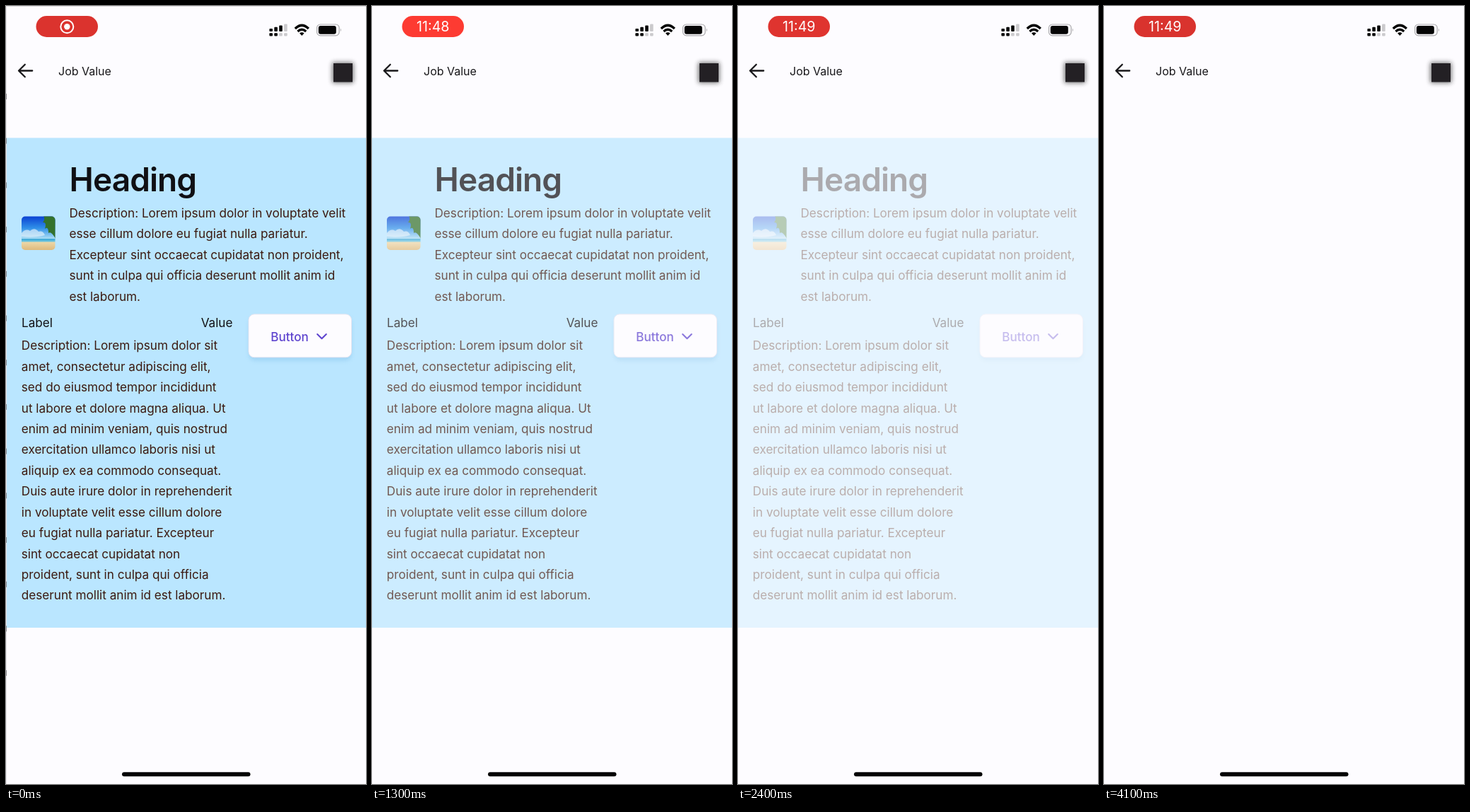
Recreate the animation shown at these times as an HTML page. Size 509 by 1100 pixels, loop 4.2 s.

```html
<!DOCTYPE html>
<html lang="en">
<head>
<meta charset="utf-8">
<title>Fading card</title>
<style>
  html, body { margin: 0; width: 100%; height: 100%; overflow: hidden; background: #fdfcff; }
  svg { display: block; width: 509px; height: 1100px; font-family: Inter, "Noto Sans", sans-serif; }
  .body { font-size: 17.15px; fill: #3b1a10; }
  .label { font-size: 17.15px; fill: #131316; }
  .line { fill: none; stroke-linecap: round; stroke-linejoin: round; }
</style>
</head>
<body>
<svg viewBox="0 0 509 1100">
  <defs>
    <linearGradient id="beach" x2="0" y2="1">
      <stop offset="0" stop-color="#0a3fd2"/>
      <stop offset=".35" stop-color="#2f8fe8"/>
      <stop offset=".66" stop-color="#a9dcf4"/>
      <stop offset=".68" stop-color="#35a5d6"/>
      <stop offset=".74" stop-color="#6cc3dd"/>
      <stop offset=".78" stop-color="#ecd6a6"/>
      <stop offset="1" stop-color="#dfba7c"/>
    </linearGradient>
    <clipPath id="thumb"><rect x="21" y="297.5" width="47.5" height="47.5" rx="5"/></clipPath>
    <filter id="soft" x="-50%" y="-50%" width="200%" height="200%"><feGaussianBlur stdDeviation="3"/></filter>
  </defs>

  <!-- Status bar -->
  <rect id="pill" x="42.5" y="14" width="87.5" height="30" rx="15"/>
  <text id="clock" x="86.3" y="36.3" text-anchor="middle" font-size="19.6" fill="#fff"></text>
  <g id="record">
    <circle cx="86.3" cy="29.3" r="9" fill="none" stroke="#fff" stroke-width="2"/>
    <circle cx="86.3" cy="29.3" r="4.2" fill="#fff"/>
  </g>
  <g id="signal"></g>
  <g class="line" stroke="#050505" stroke-width="3.4" style="stroke-linecap:butt">
    <path d="M408.8 32Q418.3 22.8 427.8 32"/>
    <path d="M412.4 36Q418.3 30.6 424.2 36"/>
  </g>
  <path d="M415 38.6Q418.3 35.8 421.6 38.6L418.3 42Z" fill="#050505"/>
  <rect x="439.6" y="26" width="31.5" height="15.8" rx="4.8" fill="none" stroke="#a9a8ab" stroke-width="1.2"/>
  <rect x="441.8" y="28.1" width="25" height="11.6" rx="3" fill="#050505"/>
  <path d="M472.8 31.5q2 2.3 0 4.8z" fill="#a9a8ab"/>

  <!-- App bar badge -->
  <rect x="461" y="79.5" width="30.5" height="29.5" rx="3" fill="#222" opacity=".6" filter="url(#soft)"/>
  <rect x="463" y="81" width="27" height="26.5" fill="#232024"/>

  <g id="screen">
    <path class="line" d="M36.2 91.5H17.2M25.8 82.8L17 91.5L25.8 100.2" stroke="#18171a" stroke-width="2.3"/>
    <text x="73" y="98" font-size="16" fill="#18171a">Job Value</text>
    <g id="card">
      <rect y="186.5" width="510" height="692.5" fill="#bae6ff"/>
      <text x="88.5" y="262" font-size="46" font-weight="600" letter-spacing="-.9" fill="#101014">Heading</text>
      <g clip-path="url(#thumb)">
        <rect x="21" y="297" width="48" height="48" fill="url(#beach)"/>
        <path d="M21 321q6-7 12-3q6-6 12 1q6-2 9 5q-14 4-33 2z" fill="#e8f5fc" opacity=".65"/>
        <path d="M69 297H52Q55 301 51 306Q57 305 54 315Q59 311 59 321Q63 318 69 329Z" fill="#34722c"/>
      </g>
      <g id="copy" class="body"></g>
      <text class="label" x="21" y="454.3">Label</text>
      <text class="label" x="319.5" y="454.3" text-anchor="end">Value</text>
      <rect x="343" y="441" width="144" height="60" rx="8" fill="#72b5e4" opacity=".4" filter="url(#soft)"/>
      <rect x="342" y="435.8" width="145.5" height="61" rx="8" fill="#fdfcff" stroke="#e3e4f1"/>
      <text x="373.3" y="473.8" font-size="17.1" font-weight="500" fill="#5f45cf">Button</text>
      <path class="line" d="M439.2 464L445.5 470.2L451.8 464" stroke="#5f45cf" stroke-width="2.1"/>
    </g>
  </g>

  <!-- Last sliver of the outgoing screen -->
  <g id="edge">
    <path d="M0 .5H509" stroke="#dedce0"/>
    <path d="M.5 0V1100" stroke="#e9e7ed"/>
    <path d="M.5 124V950" stroke="#8b8990" stroke-dasharray="8 54.7"/>
  </g>
  <rect x="164" y="1083.2" width="181.5" height="6" rx="3" fill="#050505"/>
</svg>
<script>
const LOOP = 4200;
const el = id => document.getElementById(id);
const clamp = v => Math.max(0, Math.min(1, v));

const intro = `Description: Lorem ipsum dolor in voluptate velit
esse cillum dolore eu fugiat nulla pariatur.
Excepteur sint occaecat cupidatat non proident,
sunt in culpa qui officia deserunt mollit anim id
est laborum.`;

const details = `Description: Lorem ipsum dolor sit
amet, consectetur adipiscing elit,
sed do eiusmod tempor incididunt
ut labore et dolore magna aliqua. Ut
enim ad minim veniam, quis nostrud
exercitation ullamco laboris nisi ut
aliquip ex ea commodo consequat.
Duis aute irure dolor in reprehenderit
in voluptate velit esse cillum dolore
eu fugiat nulla pariatur. Excepteur
sint occaecat cupidatat non
proident, sunt in culpa qui officia
deserunt mollit anim id est laborum.`;

const paragraph = (text, x, y) => text.split("\n")
  .map((line, i) => `<text x="${x}" y="${y + i * 29.43}">${line}</text>`).join("");
el("copy").innerHTML = paragraph(intro, 88.5, 298.8) + paragraph(details, 20.8, 486.3);

const bar = (x, y, h, on) =>
  `<rect x="${x}" y="${y}" width="4.6" height="${h}" rx="1" fill="${on ? "#050505" : "#cbcacd"}"/>`;
el("signal").innerHTML = [0, 1, 2, 3].map(i => {
  const x = 372.4 + i * 6.9, h = 4 + i * 2.2;
  return bar(x, 36 - h, h, i < 3) + bar(x, 38.2, 4.4, i < 2);
}).join("");

function draw(t) {
  const entering = t < 100;
  el("edge").style.display = entering ? "" : "none";
  el("screen").setAttribute("transform", `translate(${entering ? 1 : 0} 0)`);

  // The card dissolves linearly over about three seconds.
  el("card").style.opacity = clamp((3400 - t) / 2930);

  // The recording pill pulses every two seconds.
  const glow = (1 + Math.cos((t - 1150) / 1000 * Math.PI)) / 2;
  el("pill").setAttribute("fill", `rgb(${217 + 38 * glow},${51 + 8 * glow},${46 + 4 * glow})`);

  const swap = clamp((t - 200) / 200);
  el("record").style.opacity = 1 - swap;
  el("clock").style.opacity = swap;
  el("clock").textContent = t < 2100 ? "11:48" : "11:49";
}

const start = performance.now();
function tick() {
  draw((performance.now() - start) % LOOP);
  requestAnimationFrame(tick);
}
tick();
</script>
</body>
</html>
```
